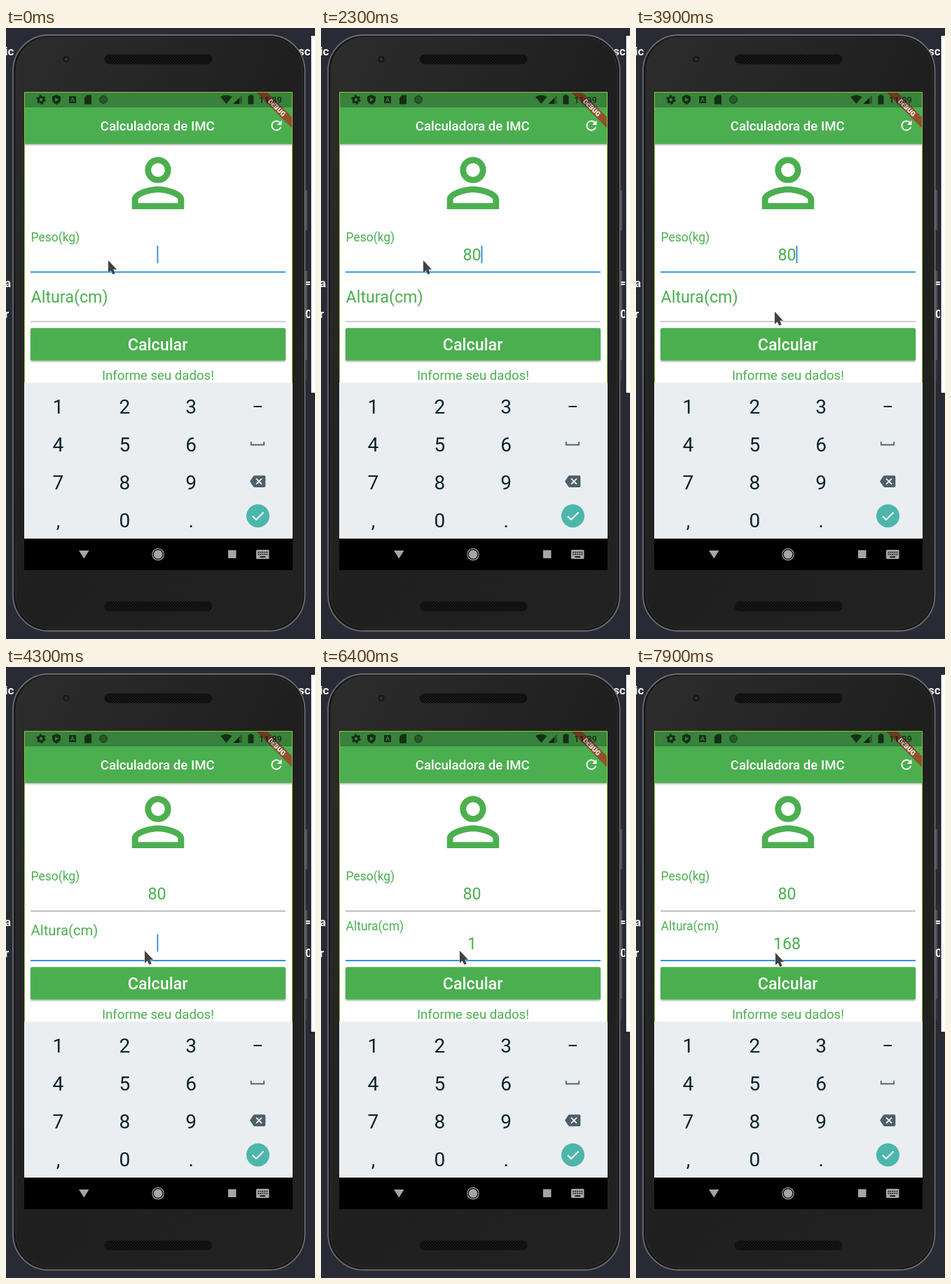
Write an HTML page that moves like this. It is 441 px wide and 870 px high and loops after 8 s.

```html
<!DOCTYPE html>
<html lang="pt">
<head>
<meta charset="utf-8">
<title>Calculadora de IMC</title>
<style>
  html, body { margin: 0; width: 100%; height: 100%; overflow: hidden; background: #282a36; }
  svg { display: block; }
  text { font-family: Roboto, sans-serif; }
  .code { font: 600 17px "Noto Sans Mono", monospace; fill: #f4f4f0; }
  .mid { text-anchor: middle; }
  .medium { font-weight: 500; fill: #fff; }
  .green { fill: #4caf50; }
  .input { font-size: 23.28px; }
  .keys { font-size: 28px; fill: #0c222b; }
</style>
</head>
<body>
<svg width="441" height="870" viewBox="0 0 441 870">
  <defs>
    <linearGradient id="body" x2="1" y2="1">
      <stop offset="0" stop-color="#2d2d2d"/>
      <stop offset=".5" stop-color="#1f1f1f"/>
      <stop offset="1" stop-color="#222"/>
    </linearGradient>
    <pattern id="mesh" width="4" height="4" patternUnits="userSpaceOnUse">
      <rect width="4" height="4" fill="#191919"/>
      <path d="M0 0h2v2h-2zM2 2h2v2h-2z" fill="#0a0a0a"/>
    </pattern>
    <filter id="shadow" x="-5%" y="-20%" width="110%" height="150%">
      <feDropShadow dx="0" dy="1.5" stdDeviation="1.3" flood-opacity=".35"/>
    </filter>
    <clipPath id="screen"><rect x="26" y="91" width="383" height="681"/></clipPath>
  </defs>

  <!-- editor behind the phone -->
  <rect width="441" height="870" fill="#282a36"/>
  <path d="M427 231h3v57h-3zM427 346h3v127h-3z" fill="#50525a"/>
  <path d="M427 473h3v29h-3z" fill="#33343c"/>
  <g class="code">
    <text x="-2" y="39">ic</text><text x="417" y="39">sc</text>
    <text x="-2" y="369">a</text><text x="-2" y="413">r</text>
    <text x="427" y="369">=</text><text x="427" y="413">0</text>
  </g>
  <path d="M434 10h7v511h-7z" fill="#15161c"/>
  <path d="M435.500 11h6v508.500h-6z" fill="#fff"/>

  <!-- phone -->
  <rect x="10" y="10" width="416.500" height="848.500" rx="51" fill="#171717" stroke="#6c6c6c" stroke-width="1.800"/>
  <rect x="14" y="13" width="409" height="842" rx="48" fill="url(#body)" stroke="#303030"/>
  <g fill="url(#mesh)" stroke="#121212">
    <rect x="141" y="38" width="153" height="13" rx="6.500"/>
    <rect x="141" y="817" width="153" height="13" rx="6.500"/>
  </g>
  <circle cx="86" cy="44.500" r="5.500" fill="#1a1a1c" stroke="#303030"/>
  <circle cx="86" cy="44.500" r="2" fill="#34383f"/>

  <g clip-path="url(#screen)">
    <rect x="26" y="91" width="383" height="681" fill="#fff"/>
    <rect x="20" y="91" width="395" height="74" fill="#4caf50" filter="url(#shadow)"/>
    <text class="mid medium" x="216.200" y="146" font-size="18.62">Calculadora de IMC</text>
    <path transform="translate(374.800 127.800) scale(.931)" fill="#fff" d="M17.650 6.350C16.200 4.900 14.210 4 12 4c-4.420 0-7.990 3.580-7.990 8s3.570 8 7.990 8c3.730 0 6.840-2.550 7.730-6h-2.080c-.82 2.330-3.040 4-5.650 4-3.310 0-6-2.690-6-6s2.690-6 6-6c1.660 0 3.140.69 4.220 1.780L13 11h7V4z"/>
    <g transform="translate(409 91) rotate(45)">
      <rect x="-60" y="26" width="120" height="11.200" fill="#b71c1c" fill-opacity=".63"/>
      <text class="mid" y="35" font-size="9.5" font-weight="900" fill="#fff">DEBUG</text>
    </g>

    <!-- status bar -->
    <rect x="26" y="91" width="383" height="22" opacity=".26"/>
    <g fill="#000" fill-opacity=".64">
      <circle cx="50" cy="102" r="3.700" fill="none" stroke="#000" stroke-opacity=".64" stroke-width="3"/>
      <circle cx="50" cy="102" r="5.800" fill="none" stroke="#000" stroke-opacity=".64" stroke-width="1.800" stroke-dasharray="3.040"/>
      <path fill-rule="evenodd" d="M72 95l6 2.500v4q0 5-6 7.500q-6-2.500-6-7.500v-4zM70 99v6l5-3z"/>
      <path fill-rule="evenodd" d="M90 97h10v10h-10zM94.300 99l-2.300 6h1.200l.5-1.400h2.600l.5 1.400h1.200l-2.300-6zM94.100 102.600l.9-2.400l.9 2.400z"/>
      <path d="M115.500 95.500h6.500v13h-10v-9.500z"/>
      <circle cx="139" cy="102" r="5.500" fill-opacity=".3" stroke="#000" stroke-opacity=".45"/>
      <path d="M306 98q8.300-5 16.600 0l-8.300 10z"/>
      <path d="M337 95.500v12.500h-12.500z" fill-opacity=".28"/>
      <path d="M333 99.500v8.500h-8.500z"/>
      <path d="M345.500 96.500h2v-1.500h4v1.500h2v12h-8z"/>
      <text x="361" y="107" font-size="13" font-weight="500">11:39</text>
    </g>

    <!-- form -->
    <path class="green" transform="translate(161.100 165) scale(4.655)" d="M12 5.900c1.160 0 2.100.94 2.100 2.100s-.94 2.100-2.100 2.100S9.900 9.160 9.900 8s.94-2.100 2.100-2.100m0 9c2.970 0 6.100 1.460 6.100 2.100v1.100H5.900V17c0-.64 3.130-2.100 6.100-2.100M12 4C9.790 4 8 5.790 8 8s1.790 4 4 4 4-1.790 4-4-1.790-4-4-4zm0 9c-2.670 0-8 1.340-8 4v3h16v-3c0-2.660-5.330-4-8-4z"/>
    <g class="green">
      <text x="35.600" y="304" font-size="17.46">Peso(kg)</text>
      <text id="heightLabel" x="35.600">Altura(cm)</text>
      <text id="weight" class="mid input" x="215.600" y="331"></text>
      <text id="height" class="mid input" x="215.600" y="401.500"></text>
      <text class="mid" x="217" y="500.500" font-size="18.62">Informe seu dados!</text>
    </g>
    <path id="weightLine" d="M35 347.500h364"/>
    <path id="heightLine" d="M35 418h364"/>
    <rect id="caret" width="1.900" height="25" fill="#2f8fe0"/>
    <rect class="green" x="35" y="427.300" width="364" height="46.200" rx="2" filter="url(#shadow)"/>
    <text class="mid medium" x="216.600" y="458.600" font-size="23.28">Calcular</text>
    <path d="M26.500 505V91.500h382V505" fill="none" stroke="#8cc63c"/>

    <!-- keyboard -->
    <rect x="26" y="505" width="383" height="222" fill="#eaeef1"/>
    <g id="keys" class="mid keys"></g>
    <path d="M353.500 539h11.500" stroke="#0c222b" stroke-width="2"/>
    <path d="M349.800 589v4.500h18.400v-4.500" fill="none" stroke="#536570" stroke-width="1.800"/>
    <path transform="translate(348 634.400) scale(.931)" fill="#4d5f69" d="M22 3H7c-.69 0-1.230.35-1.590.88L0 12l5.410 8.110c.36.53.9.89 1.590.89h15c1.100 0 2-.9 2-2V5c0-1.100-.9-2-2-2zm-3 12.590L17.590 17 14 13.410 10.410 17 9 15.590 12.590 12 9 8.410 10.410 7 14 10.590 17.590 7 19 8.410 15.410 12z"/>
    <circle cx="359.500" cy="694.700" r="16.500" fill="#4db6ac"/>
    <path d="M352 695.200l5 5l10.500-10.500" fill="none" stroke="#fff" stroke-width="2"/>

    <!-- navigation bar -->
    <rect x="26" y="727" width="383" height="45"/>
    <g fill="#a5a5a5">
      <path d="M104 744h14.500l-7.250 11.500z"/>
      <circle cx="217" cy="749.500" r="6.300"/>
      <circle cx="217" cy="749.500" r="8.200" fill="none" stroke="#a5a5a5" stroke-width="1.200"/>
      <rect x="317" y="743.500" width="11.500" height="11.500"/>
      <rect x="357" y="743" width="18.500" height="13" rx="1.500"/>
      <path d="M359.500 746.500h14M359.500 749.500h14" stroke="#000" stroke-width="1.700" stroke-dasharray="1.800 1.200"/>
      <path d="M362.500 753.200h7.500" stroke="#000" stroke-width="1.700"/>
    </g>
  </g>

  <path id="pointer" d="M0 0V17.500L3.800 14.200L6.400 19.800L9.600 18.400L7.200 12.800H12Z" fill="#424242" stroke="#e6e6e6" paint-order="stroke"/>
</svg>
<script>
const LOOP = 8000;
const el = id => document.getElementById(id);
const set = (id, attrs) => Object.entries(attrs).forEach(([k, v]) => el(id).setAttribute(k, v));
const latest = (list, t) => list.findLast(item => item[0] <= t);

el('keys').innerHTML = ['123', '456', '789', ',0.'].map((row, r) =>
  [...row].map((key, c) => `<text x="${74.4 + 94.9 * c}" y="${549 + 54 * r}">${key}</text>`).join('')
).join('');

// time, focused field (0 weight, 1 height), its text, caret visible
const typing = [
  [0, 0, '', 1], [400, 0, '', 0], [1000, 0, '', 1], [1500, 0, '', 0],
  [1900, 0, '8', 1], [2300, 0, '80', 1],
  [4200, 1, '', 1], [4700, 1, '', 0], [5200, 1, '', 1], [5700, 1, '', 0],
  [5900, 1, '1', 1], [6400, 1, '1', 0], [6700, 1, '16', 1],
  [7200, 1, '168', 1], [7700, 1, '168', 0]
];
// time, x, y
const pointerPath = [
  [0, 146, 331], [3500, 163, 395], [3600, 180, 402], [3700, 190, 404],
  [3800, 195, 404], [3900, 198, 404], [7900, 199, 407]
];
const DIGIT = 13.07;

function underline(id, focused, idle) {
  set(id, { stroke: focused ? '#2d93e8' : idle, 'stroke-width': focused ? 2 : 1 });
}

function draw(t) {
  const [, field, text, caretOn] = latest(typing, t);
  const [, x, y] = latest(pointerPath, t);
  // the label floats up in 100 ms ticks
  const lift = t < 4200 ? 0 : t < 4300 ? 0.1 : t < 4400 ? 0.52 : 1;

  el('weight').textContent = field ? '80' : text;
  el('height').textContent = field ? text : '';
  set('heightLabel', { y: 391 - 16.5 * lift, 'font-size': 23.28 - 5.82 * lift });
  underline('weightLine', field === 0, '#8c8c8c');
  underline('heightLine', field === 1, '#a0a0a0');
  set('caret', {
    x: 215.4 + text.length * DIGIT / 2,
    y: field ? 380.5 : 310,
    opacity: caretOn
  });
  set('pointer', { transform: `translate(${x} ${y})` });
}

function tick() {
  draw(performance.now() % LOOP);
  requestAnimationFrame(tick);
}
tick();
</script>
</body>
</html>
```
